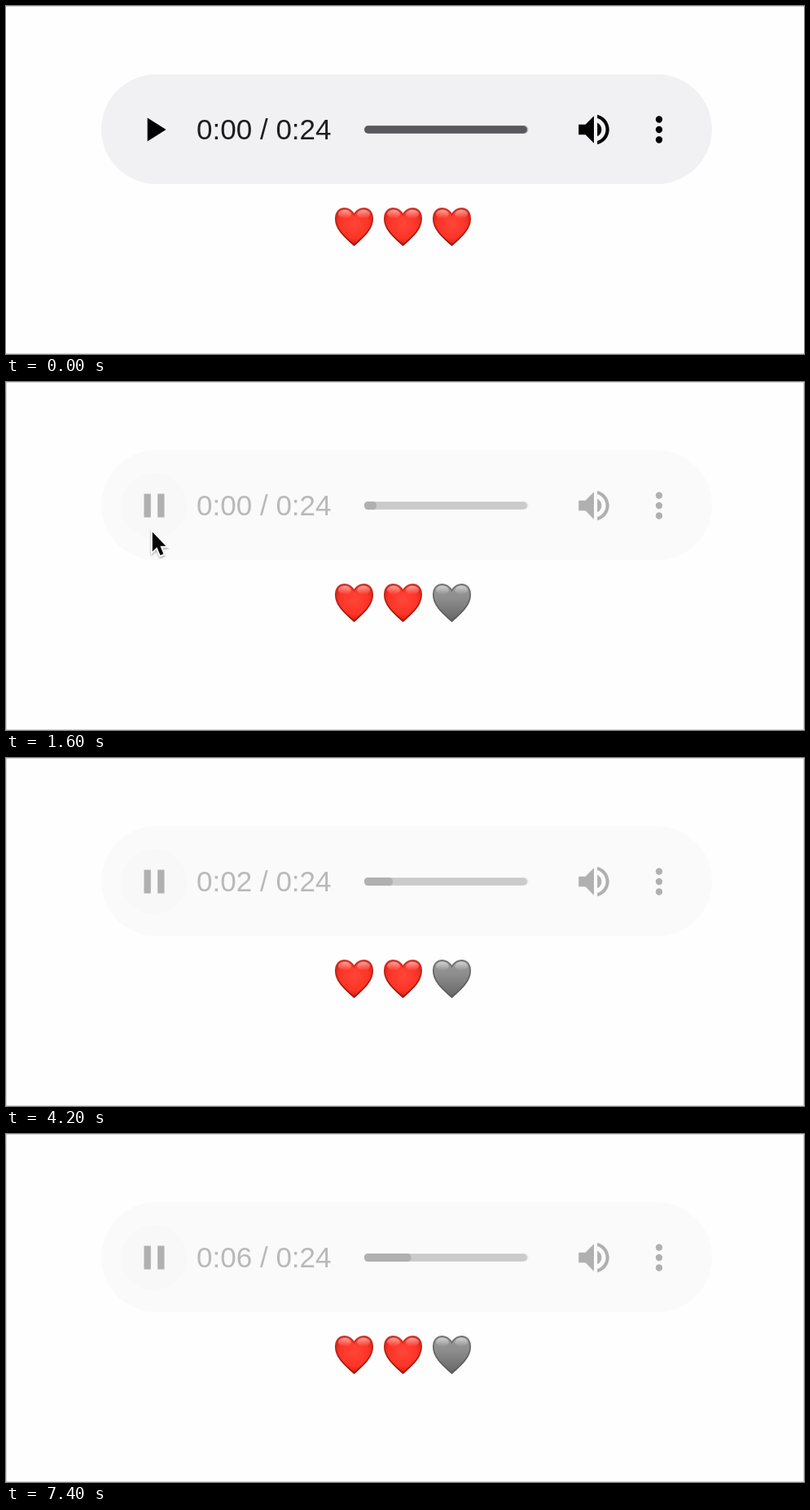
An HTML page for the animation above (7600 ms loop, 980x428 px).

```html
<!DOCTYPE html>
<html lang="en">
<head>
<meta charset="utf-8">
<title>Audio player</title>
<style>
  html, body { margin: 0; width: 100%; height: 100%; overflow: hidden; background: #fefefe; }
  svg { display: block; width: 980px; height: 428px; }
  .time { font: 35px "Liberation Sans", Arial, sans-serif; fill: #1d1d1f; white-space: pre; }
  .label { font: 25px "DejaVu Sans Mono", monospace; fill: #000; }
  .red { fill: url(#red); stroke: url(#redEdge); }
  .gray { fill: url(#gray); stroke: url(#grayEdge); }
</style>
</head>
<body>
<svg viewBox="0 0 980 428">
  <defs>
    <radialGradient id="red" cx=".5" cy=".42" r=".6">
      <stop offset="0" stop-color="#ff4638"/>
      <stop offset=".65" stop-color="#fc3427"/>
      <stop offset="1" stop-color="#cf1c0e"/>
    </radialGradient>
    <linearGradient id="redEdge" x2="0" y2="1">
      <stop offset="0" stop-color="#cb3529"/>
      <stop offset="1" stop-color="#a00d04"/>
    </linearGradient>
    <linearGradient id="gray" x2="0" y2="1">
      <stop offset="0" stop-color="#9a9a9a"/>
      <stop offset=".4" stop-color="#8c8c8c"/>
      <stop offset="1" stop-color="#666"/>
    </linearGradient>
    <linearGradient id="grayEdge" x2="0" y2="1">
      <stop offset="0" stop-color="#757575"/>
      <stop offset="1" stop-color="#555"/>
    </linearGradient>
    <linearGradient id="shine" x2="0" y2="1">
      <stop offset="0" stop-color="#fff" stop-opacity=".55"/>
      <stop offset="1" stop-color="#fff" stop-opacity="0"/>
    </linearGradient>
    <filter id="shadow" x="-50%" y="-30%" width="200%" height="170%">
      <feDropShadow dx="0" dy="1.5" stdDeviation="1.3" flood-opacity=".4"/>
    </filter>
    <g id="heart">
      <path stroke-width="1.8" d="M0 8.6C-3 3.4-7.4.9-12 .9C-18.8.9-22.7 6.2-22.7 13.4C-22.7 27.3-9.7 37.3 0 46.2C9.7 37.3 22.7 27.3 22.7 13.4C22.7 6.2 18.8.9 12 .9C7.4.9 3 3.4 0 8.6Z"/>
      <g fill="url(#shine)" stroke="none">
        <ellipse cx="-11.7" cy="8" rx="8" ry="5.4"/>
        <ellipse cx="11.7" cy="8" rx="8" ry="5.4"/>
      </g>
    </g>
  </defs>

  <rect width="980" height="428" fill="#fefefe"/>
  <path d="M0 .5H980M0 427.5H980" stroke="#d6d6d6"/>
  <path id="sides" d="M.5 0V428M979.5 0V428" stroke="#d2d2d2"/>

  <g id="player">
    <rect x="117" y="84" width="750" height="135" rx="67.5" fill="#f1f1f3"/>
    <circle id="hover" cx="182" cy="152" r="40" fill="#ececec"/>
    <g transform="translate(157 127) scale(2.0833)">
      <path id="play" d="M8 5v14l11-7z"/>
      <path id="pause" d="M6 5h4v14H6zM14 5h4v14h-4z"/>
    </g>
    <text id="time" class="time" x="234.1" y="163.6"></text>
    <rect x="440" y="147" width="201.5" height="10" rx="5" fill="#bcbcc0"/>
    <rect x="440" y="147.3" width="200" height="9.4" rx="4.7" fill="#58585c"/>
    <rect id="bar" x="440" y="147" height="10" rx="4.5"/>
    <path transform="translate(697 127) scale(2.0833)" d="M3 9v6h4l5 5V4L7 9H3zM16.5 12c0-1.77-1.02-3.29-2.5-4.03v8.05c1.48-.73 2.5-2.25 2.5-4.02zM14 3.23v2.06c2.89.86 5 3.54 5 6.71s-2.11 5.85-5 6.71v2.06c4.01-.91 7-4.49 7-8.77s-2.99-7.86-7-8.77z"/>
    <path d="M802 139.5v0M802 152v0M802 164.5v0" stroke="#000" stroke-width="8.4" stroke-linecap="round"/>
  </g>

  <use href="#heart" x="427.5" y="248" class="red"/>
  <use href="#heart" x="487.5" y="248" class="red"/>
  <use id="lastHeart" href="#heart" x="547.5" y="248" class="red"/>

  <g id="outline">
    <g fill="none" stroke="#3aaea6" stroke-width="2.5">
      <rect x="117.5" y="84" width="748" height="132.5"/>
      <rect x="117.5" y="234" width="748" height="72.5"/>
    </g>
    <path d="M117 49H293V84H117zM117 199H293V234H117z" fill="#3aaea6"/>
    <text class="label" x="122" y="73">AudioPlayer</text>
    <text class="label" x="122" y="223">AudioPlayer</text>
  </g>

  <g id="cursor" filter="url(#shadow)">
    <path d="M0 0V24L5.6 18.8L9.7 28.6L13.6 27L9.6 17.3H16.6Z" stroke="#fff" stroke-width="3.4" paint-order="stroke"/>
  </g>
</svg>
<script>
  const LOOP = 7600, ENTER = 900, START = 1300, LEAVE = 3400, GONE = 3500;
  const TICK = 266, FIRST_TICK = 1800, PX = 2.5;
  const el = {};
  document.querySelectorAll("svg [id]").forEach(n => el[n.id] = n);

  const clamp = x => Math.min(1, Math.max(0, x));
  const show = (node, on) => node.setAttribute("visibility", on ? "visible" : "hidden");

  function draw(t) {
    const playing = t >= START;

    // the player refreshes on a fixed beat and its bar grows by whole layout pixels
    const beat = Math.floor((t - FIRST_TICK) / TICK);
    const barPx = playing ? 7 + Math.floor(0.74 * beat + 0.54) : 0;
    const seconds = playing ? Math.floor(0.26 * beat + 0.56) : 0;
    el.bar.setAttribute("width", barPx * PX);
    el.time.textContent = `0:0${seconds} / 0:24`;

    // the pointer sinks a little, then darts out below
    const sink = 3 * clamp((t - 2500) / 500);
    const [x, y] = t < LEAVE ? [179.8, 184.5 + sink] : [164.5, 270];
    el.cursor.setAttribute("transform", `translate(${x} ${y})`);
    show(el.cursor, t >= ENTER && t < GONE);

    show(el.sides, t >= ENTER);
    show(el.hover, t >= ENTER);
    show(el.play, !playing);
    show(el.pause, playing);
    show(el.outline, playing && t < 1600);
    el.player.setAttribute("opacity", playing ? 0.3 : 1);
    el.lastHeart.setAttribute("class", playing ? "gray" : "red");
  }

  const begin = performance.now();
  function tick() {
    draw((performance.now() - begin) % LOOP);
    requestAnimationFrame(tick);
  }
  tick();
</script>
</body>
</html>
```
